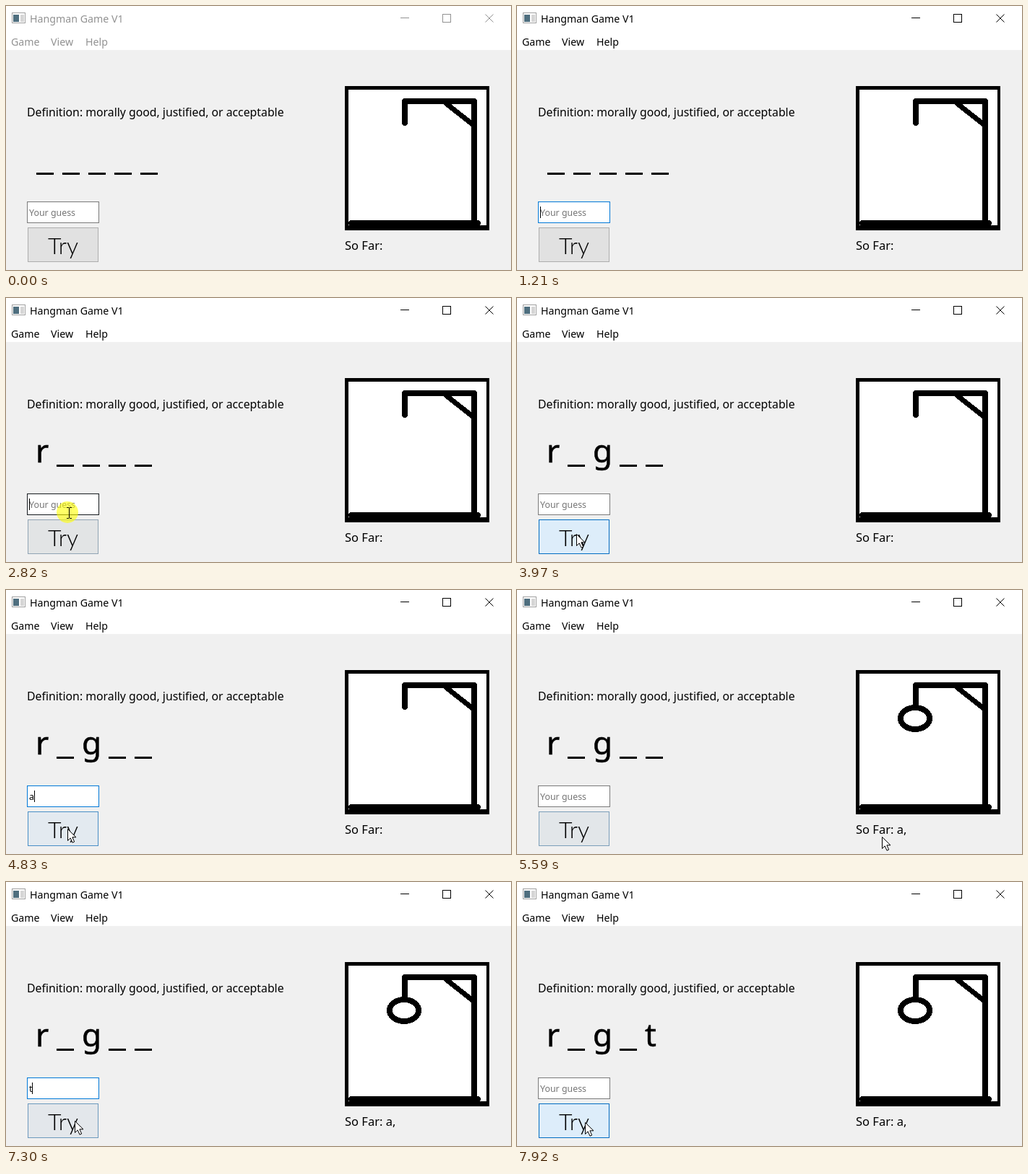
Animation, 699 px wide and 366 px high, one loop 7990 ms. Source, as an HTML page:

```html
<!DOCTYPE html>
<html lang="en">
<head>
<meta charset="utf-8">
<title>Hangman Game V1</title>
<style>
  html, body { margin: 0; width: 100%; height: 100%; overflow: hidden; background: #f0f0f0; }
  svg { display: block; font: 15.8px "Noto Sans", "Open Sans", sans-serif; }
  text { white-space: pre; }
  .crisp { shape-rendering: crispEdges; }
  #chrome { fill: #000; stroke: #000; }
  #chrome text { stroke: none; font-size: 14.2px; }
  #chrome path { fill: none; }
  #chrome.idle { fill: #929292; stroke: #929292; }
  #letters { font-size: 44px; stroke: #000; stroke-width: .5; }
  #field text { font-size: 12.4px; }
</style>
</head>
<body>
<svg width="699" height="366" viewBox="0 0 699 366">
  <rect width="699" height="366" fill="#f0f0f0"/>
  <rect width="699" height="61" fill="#fff"/>

  <g class="crisp">
    <rect x="8.5" y="9.5" width="18" height="14" fill="#fff" stroke="#a0a0a0"/>
    <rect x="10" y="12" width="8" height="10" fill="#4f6f7f"/>
    <rect x="20" y="12" width="5" height="10" fill="#d5d5d5"/>
  </g>
  <g id="chrome">
    <text x="33" y="23">Hangman Game V1</text>
    <text x="7" y="55">Game</text>
    <text x="62" y="55">View</text>
    <text x="110" y="55">Help</text>
    <path class="crisp" d="M546 16.5h12M604.5 11.5h11v11h-11z"/>
    <path d="M663.5 11.5l11 11M674.5 11.5l-11 11"/>
  </g>

  <text x="29" y="153">Definition: morally good, justified, or acceptable</text>
  <path id="dashes" class="crisp" stroke="#000" stroke-width="3"/>
  <text id="letters" x="41 69 105 141 177" y="228"></text>

  <g id="field">
    <rect id="edge" class="crisp" x="29.5" y="271.5" width="99" height="29" fill="#fff"/>
    <text id="hint" x="32" y="291" fill="#757575">Your guess</text>
    <text id="typed" x="32" y="291"></text>
    <path id="caret" class="crisp" stroke="#000"/>
  </g>

  <rect id="button" class="crisp" x="30.5" y="307.5" width="97" height="47"/>
  <text x="79" y="344" text-anchor="middle" style="font:300 32px Lato,sans-serif">Try</text>

  <rect x="469" y="111" width="200" height="200"/>
  <rect x="474" y="116" width="191" height="188" fill="#fff"/>
  <g class="crisp" fill="none" stroke="#000" stroke-width="8" stroke-linecap="round" stroke-linejoin="round">
    <path d="M478 301H653M648 299V132H552V162"/>
    <path d="M609 135L647 165" stroke-width="7"/>
    <ellipse id="head" cx="551" cy="178" rx="20" ry="15"/>
  </g>
  <text id="wrong" x="469" y="338" font-size="16.5"></text>

  <g id="mouse">
    <circle id="glow" cx="-2" cy="-1" r="15" fill="#ff0" opacity=".6"/>
    <path id="arrow" d="M.5 .5v16l3.7-3.6 2.8 6.3 2.7-1.2-2.8-6.2h5.1z" fill="#fff" stroke="#000"/>
    <path id="beam" class="crisp" d="M-3 -7.5h3M1 -7.5h3M.5 -7V7M-3 7.5h3M1 7.5h3" stroke="#000" fill="none"/>
  </g>
</svg>
<script>
const LOOP = 7990, ACTIVE = 70, TRAVEL = 280, PRESS = 90, CLICK = 80;
const WORD = 'right';

// The pointer reaches each stop at time `at`; stops on the field are clicks.
const stops = [
  { at: 1960, x: 83, y: 311 },
  { at: 2740, x: 87, y: 298 },
  { at: 3600, x: 82, y: 331 },
  { at: 4240, x: 86, y: 294 },
  { at: 4850, x: 85, y: 331 },
  { at: 5590, x: 490, y: 341 },
  { at: 5840, x: 539, y: 343 },
  { at: 6600, x: 127, y: 291 },
  { at: 7400, x: 94, y: 333 }
];
const guesses = [
  { letter: 'r', typed: 1500, sent: 2290 },
  { letter: 'g', typed: 3200, sent: 3970 },
  { letter: 'a', typed: 4520, sent: 5130 },
  { letter: 't', typed: 7160, sent: 7920 }
];

const el = id => document.getElementById(id);
const show = (id, on) => el(id).setAttribute('visibility', on ? 'visible' : 'hidden');
const mix = (a, b, p) => `color-mix(in srgb, ${a}, ${b} ${p * 100}%)`;
const easeOut = p => 1 - (1 - p) ** 3;

function mouseAt(t) {
  let x = 0, y = 36;
  for (const s of stops) {
    const p = easeOut(Math.min(Math.max((t - s.at) / TRAVEL + 1, 0), 1));
    x += (s.x - x) * p;
    y += (s.y - y) * p;
  }
  return { x: Math.round(x), y: Math.round(y) };
}

const inField = ({ x, y }) => x > 28 && x < 130 && y > 270 && y < 302;
const inButton = ({ x, y }) => x > 29 && x < 129 && y > 306 && y < 356;
const clicks = stops.filter(inField).map(s => s.at);
const focusTimes = [ACTIVE, ...clicks.map(at => at + CLICK)];

// Time of the latest focus, or 0 once the button has taken it
function focusSince(t) {
  const gained = focusTimes.findLast(f => f <= t) ?? 0;
  const lost = guesses.findLast(g => g.sent - PRESS <= t)?.sent ?? 0;
  return gained > lost ? gained : 0;
}

const pressed = t => guesses.some(g => t >= g.sent - PRESS && t < g.sent);

// Linear fade of an on/off state: its share of the last `span` ms
function fade(state, t, span, steps = 24) {
  let on = 0;
  for (let i = 0; i < steps; i++) on += state(t - span * i / steps) ? 1 : 0;
  return on / steps;
}

function drawGame(t) {
  const sent = guesses.filter(g => g.sent <= t).map(g => g.letter);
  const found = sent.filter(c => WORD.includes(c));
  const wrong = sent.filter(c => !WORD.includes(c));
  const left = found.length ? 34 : 42;
  const isOpen = c => found.includes(c);
  el('letters').textContent = [...WORD].map(c => isOpen(c) ? c : '\u00a0').join('');
  el('dashes').setAttribute('d', [...WORD].map((c, i) =>
    isOpen(c) ? '' : `M${left + 36 * i} 232.5h24`).join(''));
  el('wrong').textContent = 'So Far:' + wrong.map(c => ` ${c},`).join('');
  show('head', wrong.length);
}

function drawField(t) {
  const guess = guesses.find(g => t >= g.typed && t < g.sent);
  const focus = focusSince(t);
  el('typed').textContent = guess ? guess.letter : '';
  show('hint', !guess);
  show('caret', focus && (t - (guess ? guess.typed : focus)) % 1060 < 530);
  const width = guess ? Math.round(el('typed').getComputedTextLength()) : 0;
  el('caret').setAttribute('d', `M${32.5 + width} 278v16`);
  const hover = mix('#7a7a7a', '#171717', fade(s => inField(mouseAt(s)), t, 250));
  el('edge').style.stroke = mix(hover, '#0078d7', focus ? fade(focusSince, t, 200) : 0);
}

function drawButton(t) {
  const hover = fade(s => inButton(mouseAt(s)), t, 400);
  const press = fade(pressed, t, 250);
  el('button').style.fill = mix(mix('#e1e1e1', '#e5f1fb', hover), '#cce4f7', press);
  el('button').style.stroke = mix(mix('#adadad', '#0078d7', hover), '#005499', press);
}

function drawMouse(t) {
  const pos = mouseAt(t), beam = inField(pos);
  const on = t > stops[0].at - TRAVEL;
  el('mouse').setAttribute('transform', `translate(${pos.x} ${pos.y})`);
  show('arrow', on && !beam);
  show('beam', on && beam);
  show('glow', clicks.some(at => t >= at && t < at + 2 * CLICK));
}

function draw(t) {
  el('chrome').classList.toggle('idle', t < ACTIVE);
  drawGame(t);
  drawField(t);
  drawButton(t);
  drawMouse(t);
}

const start = performance.now();
function tick() {
  draw((performance.now() - start) % LOOP);
  requestAnimationFrame(tick);
}
tick();
</script>
</body>
</html>
```
